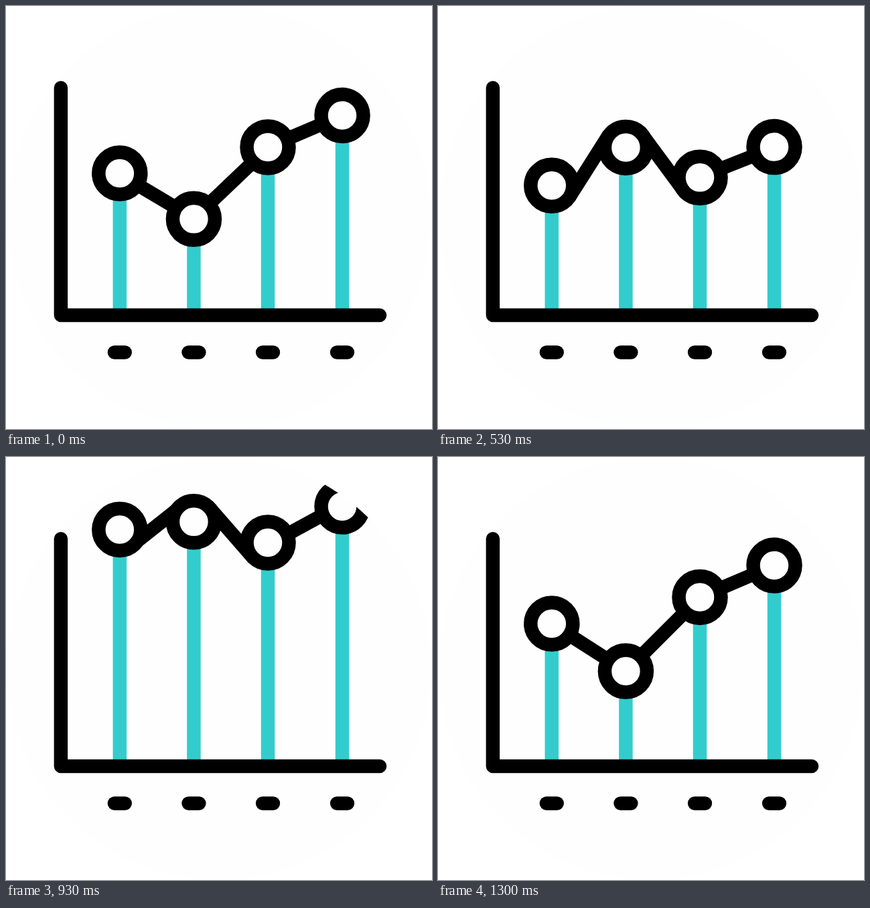
These frames come from a looping animation (636 px wide and 632 px high, 1.67 s). An HTML page:

```html
<!DOCTYPE html>
<html lang="en">
<head>
<meta charset="utf-8">
<title>Line chart</title>
<style>
  html, body { margin: 0; width: 100%; height: 100%; overflow: hidden; background: #fff; }
  svg { display: block; width: 636px; height: 632px; }
  .ink { fill: none; stroke: #000; stroke-width: 20.5; stroke-linecap: round; stroke-linejoin: round; }
  .bar { stroke: #33cccc; stroke-width: 20.5; }
  .node { fill: #fefefe; }
</style>
</head>
<body>
<svg viewBox="0 0 636 632">
  <clipPath id="disc"><circle cx="318" cy="316" r="317"/></clipPath>
  <g id="chart" clip-path="url(#disc)">
    <circle cx="318" cy="316" r="317" fill="#fefefe"/>
  </g>
</svg>
<script>
const LOOP = 1670, FPS = 30, LAST = 39;
const BASE = 462, R = 31.5;
const xs = [169.8, 280.4, 391, 502];

// Node heights of the three poses
const rest = [249, 320, 209.4, 162];
const low = [304.6, 237.3, 285.5, 241.6];
const high = [108, 96.5, 127.5, 73.6];

const chart = document.getElementById('chart');

function add(tag, cls, attrs = {}) {
  const el = document.createElementNS('http://www.w3.org/2000/svg', tag);
  el.setAttribute('class', cls);
  set(el, attrs);
  chart.append(el);
  return el;
}

function set(el, attrs) {
  for (const k in attrs) el.setAttribute(k, attrs[k]);
}

// Cubic bezier easing with control points (a, 0) and (b, 1)
function ease(a, b) {
  return u => {
    if (u <= 0) return 0;
    if (u >= 1) return 1;
    let lo = 0, hi = 1, s;
    for (let i = 0; i < 24; i++) {
      s = (lo + hi) / 2;
      const x = 3 * s * (1 - s) * ((1 - s) * a + s * b) + s ** 3;
      if (x < u) lo = s; else hi = s;
    }
    return s * s * (3 - 2 * s);
  };
}

const drop = ease(.333, .333);
const rise = ease(.363, .35);
const riseSnappy = ease(.382, .302);
const settle = ease(.335, .29);

const phases = [
  { t0: -33.3, t1: 400, from: rest, to: low, curve: () => drop },
  { t0: 400, t1: 966.7, from: low, to: high, curve: i => i === 1 ? riseSnappy : rise },
  { t0: 966.7, t1: 1300, from: high, to: rest, curve: () => settle }
];

function height(i, t) {
  const p = phases.find(p => t < p.t1) || phases[2];
  const k = p.curve(i)((t - p.t0) / (p.t1 - p.t0));
  return p.from[i] + (p.to[i] - p.from[i]) * k;
}

const bars = xs.map(x => add('line', 'bar', { x1: x, x2: x, y1: BASE }));

// Each link is pinned to its rings where it leaves them in the rest pose
const links = [0, 1, 2].map(i => {
  const dx = xs[i + 1] - xs[i], dy = rest[i + 1] - rest[i];
  const k = R / Math.hypot(dx, dy);
  const el = add('line', 'ink', { x1: xs[i] + dx * k, x2: xs[i + 1] - dx * k });
  return { el, oy: dy * k };
});

const nodes = xs.map(x => add('circle', 'ink node', { cx: x, r: R }));

add('path', 'ink', { d: `M81.9 122.2V${BASE}H558` });
xs.forEach(x => add('path', 'ink', { d: `M${x - 7.9} 517.6h15.8` }));

function draw(now) {
  const frame = Math.min(LAST, Math.floor((now % LOOP + 3.4) * FPS / 1000));
  const t = frame * 1000 / FPS;
  const ys = xs.map((x, i) => height(i, t));
  ys.forEach((y, i) => {
    set(bars[i], { y2: y });
    set(nodes[i], { cy: y });
  });
  links.forEach(({ el, oy }, i) => set(el, { y1: ys[i] + oy, y2: ys[i + 1] - oy }));
}

const start = performance.now();
function tick() {
  draw(performance.now() - start);
  requestAnimationFrame(tick);
}
tick();
</script>
</body>
</html>
```
